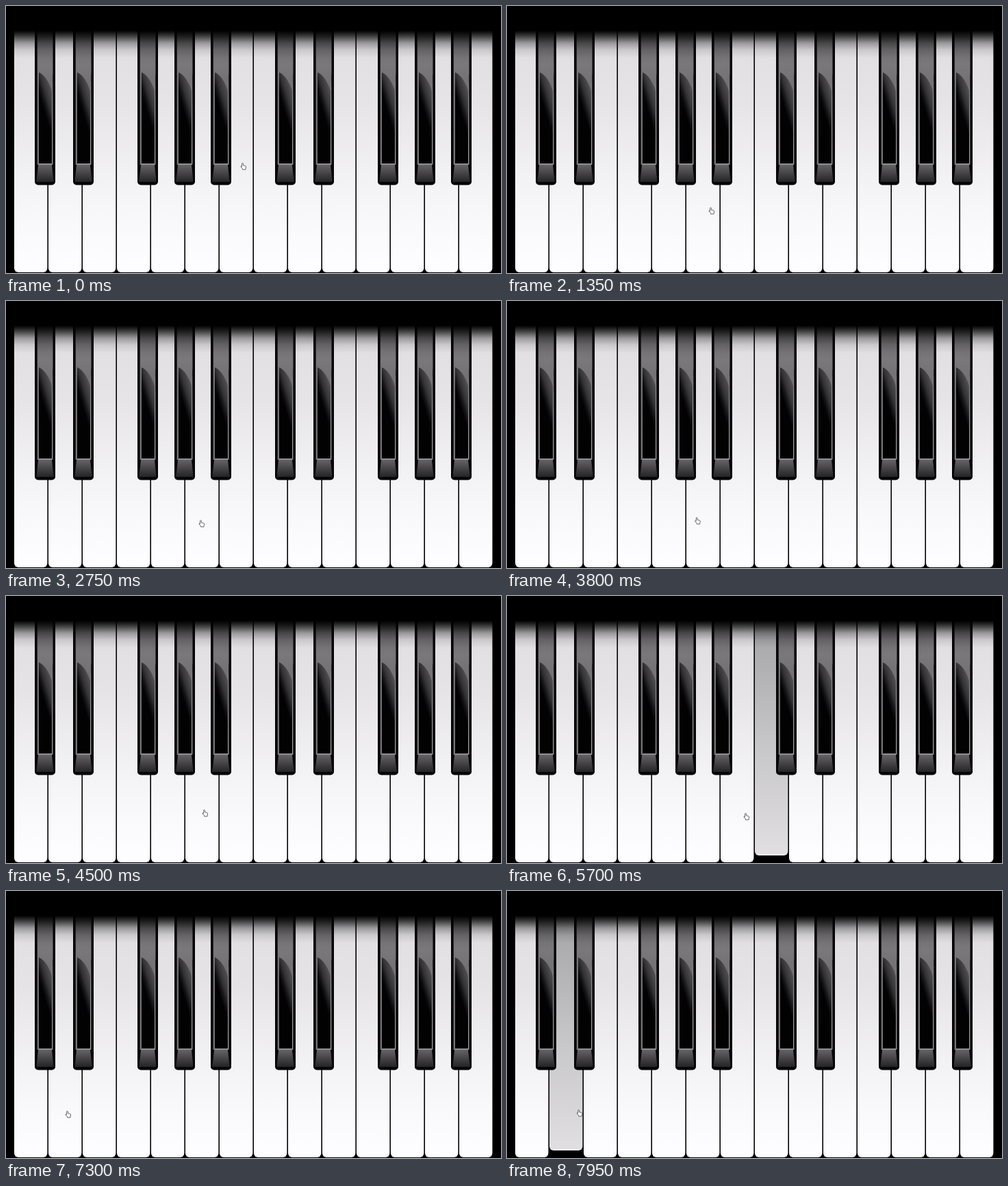
Write an HTML page with a canvas that moves like this. It is 723 px wide and 390 px high and loops after 8000 ms.

```html
<!DOCTYPE html>
<html>
<head>
<meta charset="utf-8">
<style>
html, body { margin: 0; width: 723px; height: 390px; overflow: hidden; background: #000; }
canvas { display: block; }
</style>
</head>
<body>
<canvas id="stage" width="723" height="390"></canvas>
<script>
const ctx = document.getElementById('stage').getContext('2d');
const LOOP = 8000, STEP = 50, HOLD = 50, KEY_W = 50, LEFT = 12;
const OCTAVE = 7 * KEY_W + 1;
const D = 1, G = 4, A = 5, C = 7;

// A steady beat on A, then the notes around it
const notes = Array.from({ length: 8 }, (_, i) => [600 * (i + 1), A]);
notes.push([1000, G], [2100, G], [5700, C], [6700, G], [7700, D], [7950, D]);

// Turning points of the pointer: time, x, y
const path = [
  [0, 347, 234], [350, 278, 298], [500, 278, 298], [900, 184, 315],
  [1350, 299, 299], [2050, 238, 318], [2750, 286, 325], [4200, 277, 320],
  [4500, 291, 317], [5100, 298, 318], [5550, 386, 320], [5700, 350, 322],
  [6700, 219, 322], [7300, 91, 326], [7650, 91, 326], [LOOP, 107, 324]
];

function shade(x0, y0, x1, y1, ...stops) {
  const g = ctx.createLinearGradient(x0, y0, x1, y1);
  stops.forEach(([at, color]) => g.addColorStop(at, color));
  return g;
}

function fill(style, shape) {
  ctx.fillStyle = style;
  ctx.fill(shape);
}

function box(x, y, w, h, r = 0) {
  const p = new Path2D();
  p.roundRect(x, y, w, h, r);
  return p;
}

const whiteUp = shade(0, 36, 0, 389, [0, '#dfdde0'], [.3, '#e6e4e7'], [.6, '#f2f1f4'], [.8, '#f9f8fb'], [1, '#fefdff']);
const whiteDown = shade(0, 36, 0, 379, [0, '#a5a4a6'], [.25, '#b4b3b5'], [.55, '#c8c7c9'], [.99, '#e0dee1'], [1, '#f4f3f5']);
const topFade = shade(0, 36, 0, 76, [0, '#000'], [.2, 'rgba(0,0,0,.72)'], [.45, 'rgba(0,0,0,.32)'], [.7, 'rgba(0,0,0,.1)'], [1, 'rgba(0,0,0,0)']);
const body = shade(0, 36, 0, 232, [0, '#605e60'], [.25, '#7a787a'], [.45, '#706e70'], [1, '#777577']);
const sheen = shade(25, 118, 5, 124, [0, '#585658'], [.55, '#333234'], [.8, '#141315'], [1, '#020203']);
const lip = shade(0, 232, 0, 257, [0, '#656366'], [.5, '#454346'], [1, '#242325']);
const rim = shade(0, 100, 0, 232, [0, 'rgba(160,158,160,0)'], [.3, '#8d8b8d'], [1, '#a9a7a9']);

const panel = new Path2D('M6 231V97C14 100 21 111 25 124V231Z');
const lipShape = new Path2D('M5 232H25L27.5 256Q27 257 25.5 257H4Q2.5 257 2.5 256Z');
const hand = new Path2D('M-2.4 .5V-4.1Q-1.5-5.4-.6-4.1V-1.2L2.6-.6Q3.7-.2 3.6 1L3.1 3.3V4.9H-1.5V3.6L-4 .9Q-4.2-.5-3 0Z');

function drawWhite(i, down) {
  const x = LEFT + i * KEY_W;
  fill(down ? whiteDown : whiteUp, box(x, 36, KEY_W - 1.6, down ? 343 : 353, [0, 0, 6, 6]));
}

function drawBlack(x) {
  ctx.save();
  ctx.translate(x, 0);
  fill('#030304', box(0, 30, 30, 231.5, [0, 0, 5, 5]));
  fill(body, box(3, 30, 23.5, 202));
  fill('#29282a', box(3, 30, 1, 202));
  fill(sheen, panel);
  fill(rim, box(25, 110, 1.2, 121));
  fill('#080809', box(26.5, 100, 2, 132));
  fill(lip, lipShape);
  fill('#b5b3b5', box(6, 230.2, 19, 1.2));
  ctx.restore();
}

function drawPointer([x, y]) {
  ctx.save();
  ctx.translate(x, y);
  fill('#fff', hand);
  ctx.lineWidth = .9;
  ctx.lineJoin = 'round';
  ctx.strokeStyle = '#555';
  ctx.stroke(hand);
  ctx.restore();
}

function pointerAt(t) {
  const i = path.findIndex(p => p[0] > t);
  const [t0, x0, y0] = path[i - 1], [t1, x1, y1] = path[i];
  const k = (t - t0) / (t1 - t0);
  const ease = k * k * (3 - 2 * k);
  return [x0 + (x1 - x0) * ease, y0 + (y1 - y0) * ease];
}

function draw(t) {
  ctx.fillStyle = '#000';
  ctx.fillRect(0, 0, 723, 390);
  for (let i = 0; i < 14; i++) {
    drawWhite(i, notes.some(([on, key]) => key === i && t >= on && t < on + HOLD));
  }
  for (const octave of [0, OCTAVE]) {
    for (const offset of [30, 86, 180, 234, 287]) drawBlack(LEFT + octave + offset);
  }
  ctx.fillStyle = topFade;
  ctx.fillRect(0, 0, 723, 76);
  drawPointer(pointerAt(t));
}

const start = performance.now();
function tick() {
  const t = (performance.now() - start) % LOOP;
  draw(Math.floor(t / STEP) * STEP);
  requestAnimationFrame(tick);
}
tick();
</script>
</body>
</html>
```
